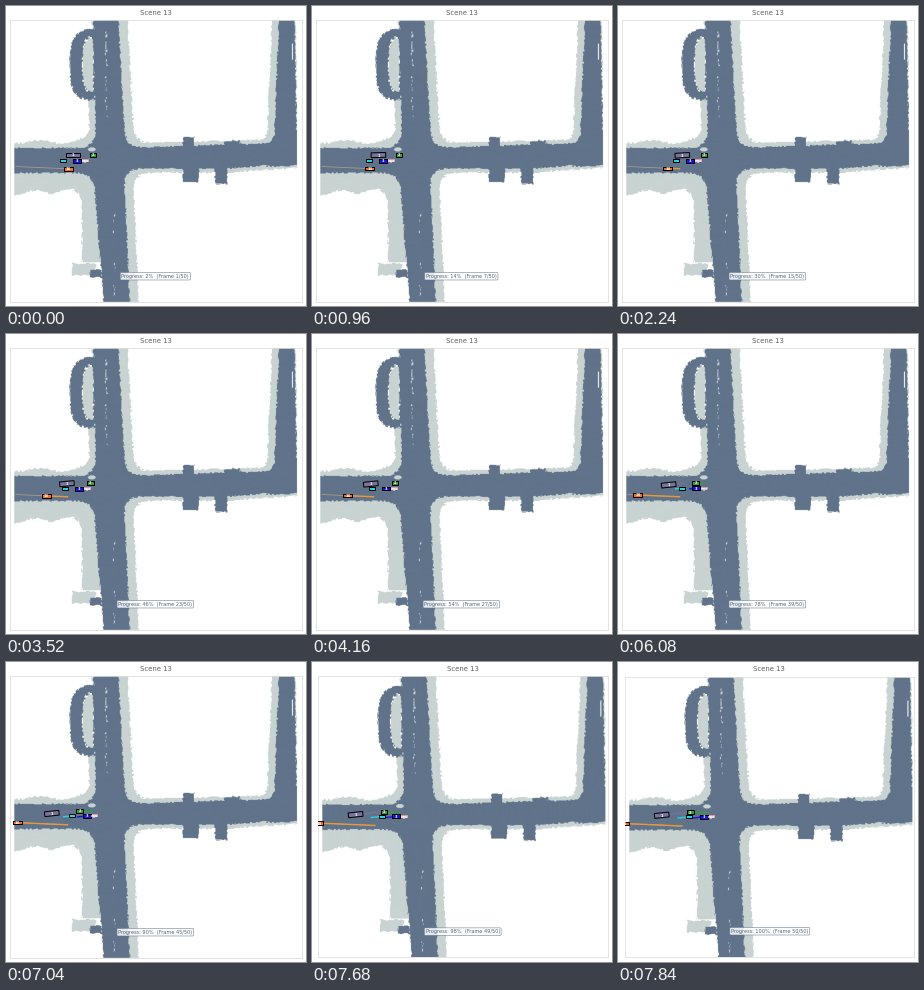
A matplotlib script for the animation above (8000 ms loop, 300x300 px).

```python
import numpy as np
import matplotlib.pyplot as plt
from matplotlib.animation import FuncAnimation
from matplotlib.colors import to_rgb
from matplotlib.patches import Rectangle
from matplotlib.transforms import Affine2D

SIZE, N = 300, 50
L, R, T, B = 4.2, 296, 13.5, 295.6
PX = 0.72  # points per pixel at 100 dpi
ROAD, WALK = "#60738a", "#c8d3d2"
rng = np.random.default_rng(13)

# Map grid, two cells per pixel; a field is negative inside its shape
X, Y = np.meshgrid(np.arange(0.25, SIZE, 0.5), np.arange(0.25, SIZE, 0.5))


def band(c, low, high):
    return np.maximum(low - c, c - high)


def box(x0, x1, y0, y1):
    return np.maximum(band(X, x0, x1), band(Y, y0, y1))


def join(a, b, k):
    """Union of two fields with a rounded inner corner."""
    h = np.maximum(k - np.abs(a - b), 0) / k
    return np.minimum(a, b) - h * h * k / 4


def oval(cx, cy, rx, ry, power=3):
    r = np.abs((X - cx) / rx) ** power + np.abs((Y - cy) / ry) ** power
    return (r ** (1 / power) - 1) * min(rx, ry)


def streets(north, south, west, east, side):
    """Crossing plus the eastern side street, from (low, high) edges."""
    vertical = np.where(Y < 154, band(X, *north), band(X, *south))
    level = np.where(X < 105, band(Y, *west), band(Y, *east))
    side = np.maximum(band(X, *side), Y - 157)
    return join(join(vertical, level, 18), side, 10)


north = 87.5 + 0.02 * (Y - 14), 112.5 + 0.055 * (Y - 14)
south = 89 + 0.08 * (Y - 185), 119 + 0.045 * (Y - 185)
east = 141.5 - 0.03 * (X - 130), 162.5 - 0.08 * np.maximum(0, X - 222)
side = 273 - 0.04 * (Y - 14), 288.5 + 0.02 * (Y - 14)

road = streets(north, south, (142, 167), east, side)
for bay in [(177, 188, 131, 150), (177, 193, 150, 176), (218, 234, 135, 150),
            (209, 221, 150, 178), (84, 96, 263, 271)]:
    road = np.minimum(road, box(*bay))
loop = np.maximum(oval(88, 59, 24, 35), X - 89)
island = np.maximum(oval(87, 59, 10.5, 27), X - 87.5)
road = np.minimum(road, np.maximum(loop, -island))

walk = streets((north[0] - np.where(Y > 92, 6, 1), north[1] + 9),
               (np.where(Y < 256, 76, south[0]), south[1] + 9),
               (136 + 1.5 * np.sin(X / 7), 188 - 0.06 * X + 2 * np.sin(X / 6)),
               (east[0] - 4, east[1] + 4),
               (side[0] - 7, side[1] + 1))
walk = np.minimum(np.minimum(walk, island), box(66, 90, 257, 269))

ragged = np.kron(rng.uniform(-0.9, 0.9, (150, 150)), np.ones((4, 4)))
inside = box(8.7, 291, T, B) < 0
terrain = np.ones(X.shape + (3,))
terrain[(walk + ragged < 0) & inside] = to_rgb(WALK)
terrain[(road + 0.8 * ragged < 0) & inside] = to_rgb(ROAD)
terrain[(oval(86, 143.5, 4, 2, 2) < 0)] = to_rgb(WALK)
terrain[(box(286, 287, 38, 54) < 0)] = 1
for x, y0, y1, count in [(100, 17, 116, 24), (108, 196, 290, 14)]:
    for y in rng.uniform(y0, y1, count):
        gx = x + rng.uniform(-1, 1)
        dash = box(gx, gx + 0.8, y, y + rng.uniform(1, 3))
        terrain[dash < 0] = to_rgb(WALK)

fig = plt.figure(figsize=(3, 3), dpi=100, facecolor="white")
ax = fig.add_axes([0, 0, 1, 1])
ax.imshow(terrain, extent=(0, SIZE, SIZE, 0), aspect="auto")
ax.set_xticks([])
ax.set_yticks([])
for spine in ax.spines.values():
    spine.set(color="#dcdcdc", linewidth=0.8 * PX)


class Car:
    """Box that speeds up from start to end, leaving a trail."""

    def __init__(self, start, end, power, size, color, label="", trail=None,
                 tilt=0, edge="black"):
        ease = np.linspace(0, 1, N) ** power
        self.x, self.y = (a + (b - a) * ease for a, b in zip(start, end))
        self.tilt = tilt
        w, h = size
        self.trail, = ax.plot([], [], color=trail or color, lw=1.4 * PX,
                              zorder=5, solid_capstyle="butt")
        self.box = ax.add_patch(Rectangle((-w / 2, -h / 2), w, h, fc=color,
                                          ec=edge, lw=PX, zorder=6))
        self.text = ax.text(0, 0, label, color="white", fontsize=2.6,
                            weight="bold", ha="center", va="center_baseline",
                            zorder=7)

    def move(self, i):
        x, y = self.x[i], self.y[i]
        self.trail.set_data(self.x[:i + 1], self.y[:i + 1])
        turn = self.tilt * min(1, i / 25)
        self.box.set_transform(
            Affine2D().rotate_deg(turn).translate(x, y) + ax.transData)
        self.text.set_position((x, y))


cars = [
    Car((67, 149), (41.3, 152), 1.8, (14.5, 4.8), "#77739a", "1", tilt=-6),
    Car((87, 149), (70, 149), 2.3, (6.5, 4), "#2f9e3f", "2"),
    Car((57, 154.8), (69, 153.7), 2.2, (6, 3), "#22d3e0"),
    Car((79.5, 154.7), (91.5, 153.5), 2.3, (7, 2.6), "#d99aa8", "ego",
        edge="none"),
    Car((71, 155), (83.5, 153.5), 2.3, (8, 3.6), "#1414e0", "3"),
    Car((62, 162.8), (4, 160.3), 1.25, (9, 3.4), "#ff6a1f", "14",
        trail="#e8983a"),
]
lead = cars[-1]
on_map = lead.x > 8.7
ax.plot(lead.x[on_map], lead.y[on_map], color="#a89c88", lw=0.8 * PX, zorder=4)

title = fig.text(0, 0, "Scene 13", fontsize=4.95, color="#606060",
                 ha="center", va="center")
status = fig.text(0, 0, "", fontsize=3.65, color="#54667a",
                  ha="center", va="center",
                  bbox=dict(boxstyle="round,pad=0.25,rounding_size=0.2",
                            fc="white", alpha=0.85, ec="#60738a", lw=0.6 * PX))


def layout(s):
    """Shrink the plot when the leading label runs over its left side."""
    left, top, bottom = L + s, T + s / 2, B - s / 3
    ax.set_position([left / SIZE, 1 - bottom / SIZE,
                     (R - left) / SIZE, (bottom - top) / SIZE])
    ax.set_xlim(L, R - s)
    ax.set_ylim(T + bottom - top, T)
    title.set_position(((149.9 + s / 2) / SIZE, 1 - 7.2 / SIZE))
    status.set_position(((149.3 + s) / SIZE, 1 - (270.2 - s / 2.5) / SIZE))


def draw(i):
    layout(0.7 * max(0, L + 3.3 - lead.x[i]))
    for car in cars:
        car.move(i)
    n = i + 1
    status.set_text(f"Progress: {100 * n // N}%  (Frame {n}/{N})")
    return []


anim = FuncAnimation(fig, draw, frames=N, interval=160, repeat=True,
                     repeat_delay=0, blit=False)
plt.show()
```
